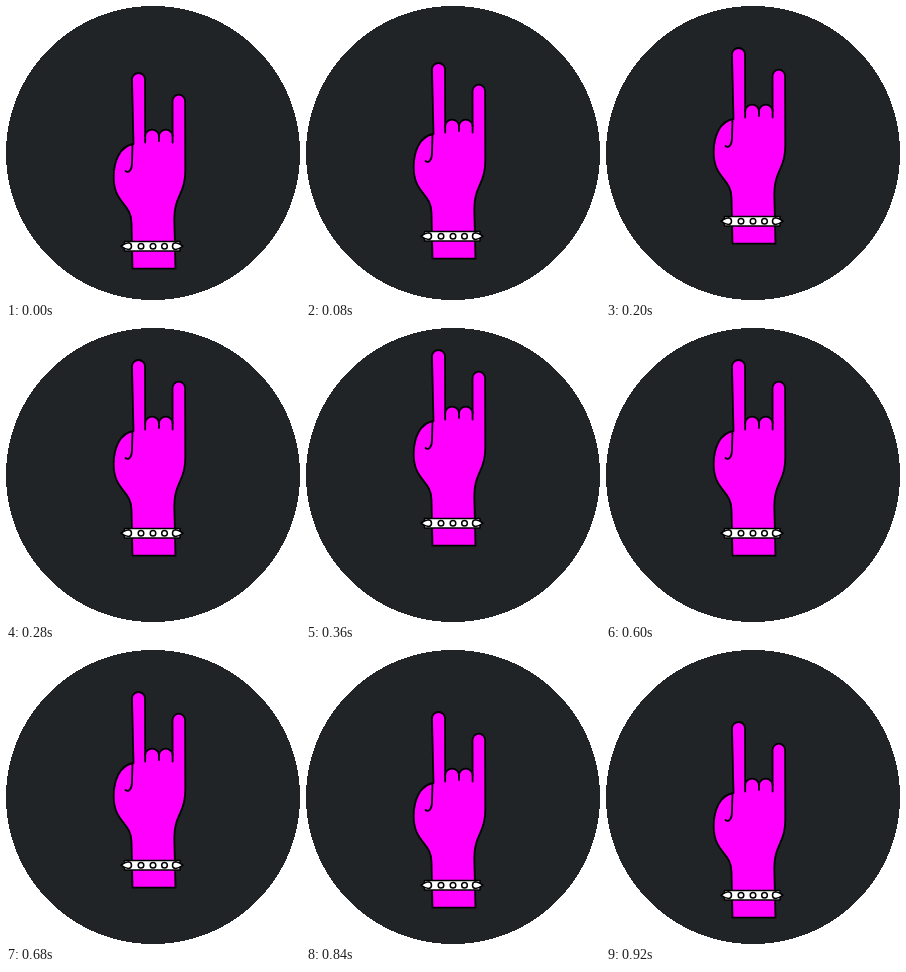
An HTML page with a canvas that plays this animation: 294x294 px, repeating every 1 s.

```html
<!DOCTYPE html>
<html lang="en">
<head>
<meta charset="utf-8">
<title>Rock on</title>
<style>
  html, body { margin: 0; width: 100%; height: 100%; overflow: hidden; background: #fff; }
  canvas { display: block; width: 294px; height: 294px; }
</style>
</head>
<body>
<canvas id="stage"></canvas>
<script>
const SIZE = 294, LOOP = 1000, STEP = 40;
const canvas = document.getElementById('stage');
const ctx = canvas.getContext('2d');
const dpr = window.devicePixelRatio || 1;
canvas.width = canvas.height = SIZE * dpr;

const hand = new Path2D(`M127.5 138 L126 73.5 A6.5 6.5 0 0 1 139 73.5 L139.2 130
  A6.9 6.3 0 0 1 153 130 A6.8 6.3 0 0 1 166.6 130 L166.5 95
  A6.3 6.3 0 0 1 179.1 95 L179.3 160 C180 190 168.3 188 168.3 213 L169.5 262.7 L126.5 262.7
  L125.5 217 C125.5 197 107.7 198 107.7 171 C107.7 155 114 140 127.5 138 Z`);
const creases = new Path2D(`M126.5 138 L126 157 C126 164 122.5 167.5 119.5 165
  M139.2 129 V136.5 M153 129 V135 M166.6 129 V136.5`);
const band = new Path2D('M118.5 235.5 H174 V245 H118.5 Z');
const spikes = new Path2D(`M115 240.2 Q119 237 122.5 236.8 Q125.5 237.2 125.5 240.2 Q125.5 243.2 122.5 243.6 Q119 243.4 115 240.2 Z
  M177 240.2 Q173 237 169.5 236.8 Q166.5 237.2 166.5 240.2 Q166.5 243.2 169.5 243.6 Q173 243.4 177 240.2 Z`);
const bolt = new Path2D('M82.5 39.5 L56.5 75.5 L71 74.5 L66.5 98 L91.5 64.5 L78 66.5 Z');

function shape(path, fill, width) {
  ctx.fillStyle = fill;
  ctx.fill(path);
  ctx.lineWidth = width;
  ctx.stroke(path);
}

// Filled row by row to keep a hard, unsmoothed edge.
function drawDisc(r) {
  ctx.fillStyle = '#202427';
  for (let y = 0; y < SIZE; y++) {
    const half = Math.round(Math.sqrt(r * r - (y + 0.5 - r) ** 2));
    ctx.fillRect(r - half, y, 2 * half, 1);
  }
}

function drawHand(dy) {
  ctx.save();
  ctx.translate(0, dy);
  shape(hand, '#ff00ff', 1.8);
  ctx.stroke(creases);
  shape(band, '#fff', 1.5);
  shape(spikes, '#fff', 1.5);
  for (const x of [135, 147, 158.5]) {
    const stud = new Path2D();
    stud.arc(x, 240.2, 2.8, 0, Math.PI * 2);
    shape(stud, '#fff', 1.5);
  }
  ctx.restore();
}

function drawBolts() {
  ctx.fillStyle = '#ffff00';
  for (const dx of [0, 151]) {
    ctx.save();
    ctx.translate(dx, 0);
    ctx.fill(bolt);
    ctx.restore();
  }
}

function draw(ms) {
  // The hand rises for 11 steps, falls for 12, then rests for one.
  const step = Math.min(23, Math.floor((ms % LOOP) / STEP));
  const dy = 5 * (Math.abs(step - 11) - 11);

  ctx.setTransform(dpr, 0, 0, dpr, 0, 0);
  ctx.clearRect(0, 0, SIZE, SIZE);
  ctx.strokeStyle = '#000';
  ctx.lineJoin = ctx.lineCap = 'round';

  drawDisc(SIZE / 2);
  drawHand(dy);
  if (step >= 11 && step < 15) drawBolts();
}

const start = performance.now();
function tick() {
  draw(performance.now() - start);
  requestAnimationFrame(tick);
}
tick();
</script>
</body>
</html>
```
